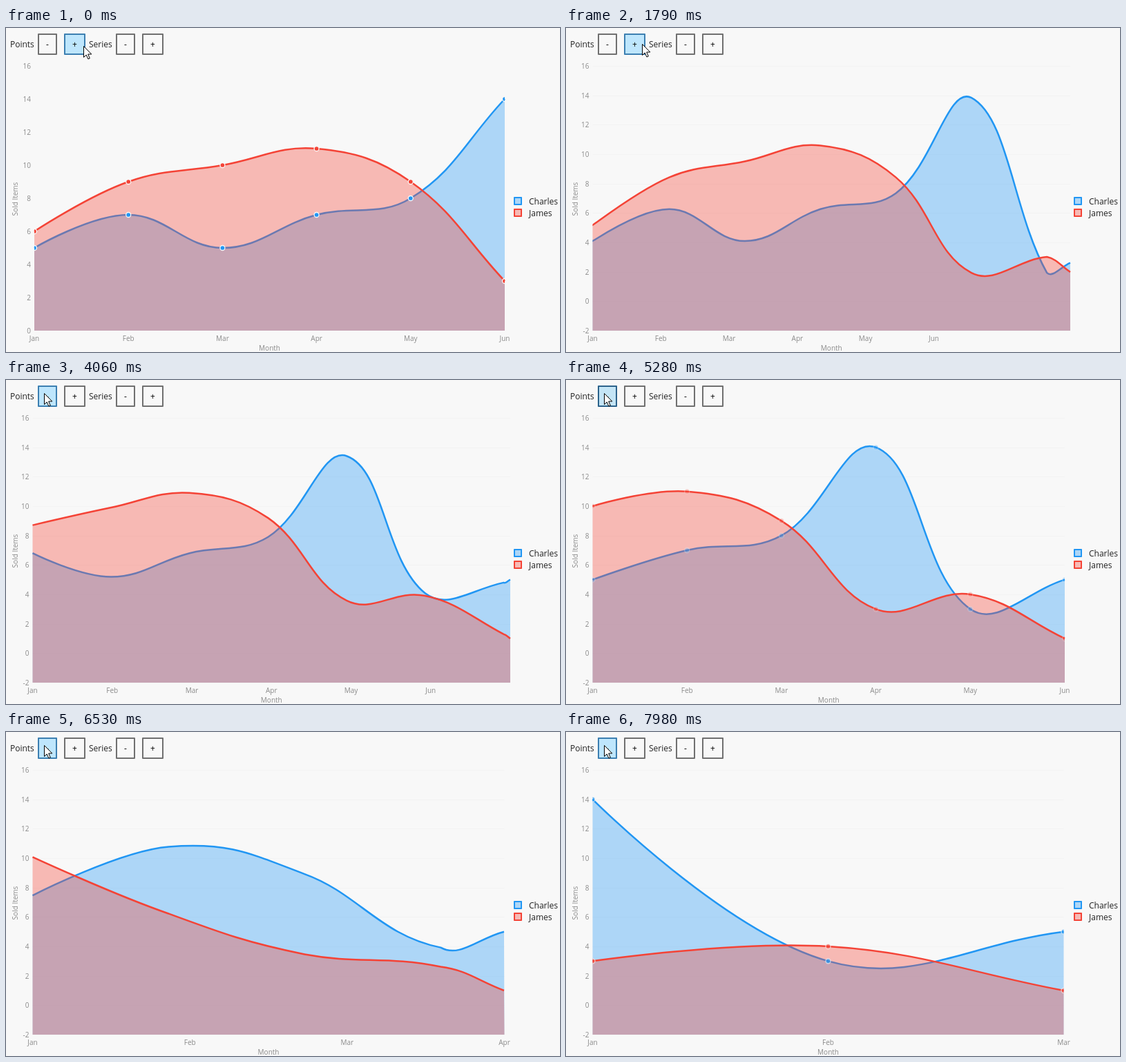
An HTML page with a canvas that plays this animation: 802x470 px, repeating every 8 s.

```html
<!DOCTYPE html>
<html lang="en">
<head>
<meta charset="utf-8">
<title>Points and series</title>
<style>
html, body { margin: 0; height: 100%; overflow: hidden; background: #f8f8f8; }
canvas { display: block; }
</style>
</head>
<body>
<canvas id="stage" width="802" height="470"></canvas>
<script>
const ctx = document.getElementById('stage').getContext('2d');
const LOOP = 8000, SPEED = 500, TOP = 55, BOTTOM = 439, BACK = '#f8f8f8', SMOOTHNESS = 0.8;
const months = ['Jan', 'Feb', 'Mar', 'Apr', 'May', 'Jun'];
const series = [
  { name: 'Charles', rgb: '33,150,243', values: [5, 7, 5, 7, 8, 14, 3, 5] },
  { name: 'James', rgb: '244,67,54', values: [6, 9, 10, 11, 9, 3, 4, 1] }
];

// Each view takes over at "start" and morphs from the one before it.
const views = [
  [-1000, 0, 6, 0, 41, 722],
  [540, 0, 7, 0, 41, 730],
  [1620, 0, 8, -2, 38.5, 730],
  [3610, 1, 7, -2, 38.5, 730],
  [4640, 2, 6, -2, 38.5, 722],
  [5460, 3, 5, -2, 38.5, 720.5],
  [6300, 4, 4, -2, 38.5, 721.5],
  [7140, 5, 3, -2, 38.5, 720.5]
].map(([start, first, count, min, left, right]) => ({ start, first, count, min, left, right }));

const presses = [[260, 500], [1400, 1590], [3320, 3570], [4420, 4600],
  [5230, 5420], [6080, 6260], [6910, 7100], [7740, 7970]];
const buttons = [[46, 28, '-'], [84, 31, '+'], [159, 28, '-'], [197, 31, '+']];

const clamp = v => Math.max(0, Math.min(1, v));
const lerp = (a, b, k) => a + (b - a) * k;
const mix = (a, b, k) => a.map((v, i) => lerp(v, b[i], k));
const xAt = (view, i) => lerp(view.left, view.right, i / (view.count - 1));
const yAt = (view, v) => lerp(BOTTOM, TOP, (v - view.min) / (16 - view.min));

// Smooth curve: a start point and one [c1, c2, end] group per segment.
function curve(view, values) {
  const pts = values.slice(view.first, view.first + view.count)
    .map((v, i) => [xAt(view, i), yAt(view, v)]);
  const dist = (a, b) => Math.hypot(a[0] - b[0], a[1] - b[1]);
  const control = (before, at, after, sign) => {
    const a = dist(before, at), b = dist(at, after);
    const share = (sign > 0 ? b : a) / (a + b);
    return at.map((v, k) => v + sign * SMOOTHNESS * share * (after[k] - before[k]) / 2);
  };
  const segments = pts.slice(1).map((end, i) => [
    ...(i ? control(pts[i - 1], pts[i], end, 1) : pts[0]),
    ...control(pts[i], end, pts[i + 2] || end, -1),
    ...end
  ]);
  return { pts, segments };
}

// Added segments grow out of the last point, removed ones shrink into it.
function morph(from, to, k) {
  const collapsed = ({ pts }) => Array(3).fill(pts[pts.length - 1]).flat();
  const longer = from.segments.length > to.segments.length ? from : to;
  return {
    start: [to.pts[0][0], lerp(from.pts[0][1], to.pts[0][1], k)],
    segments: longer.segments.map((_, i) =>
      mix(from.segments[i] || collapsed(from), to.segments[i] || collapsed(to), k))
  };
}

function text(str, x, y, size, color, align = 'left') {
  ctx.font = `${size}px "Open Sans", "Noto Sans", sans-serif`;
  ctx.fillStyle = color;
  ctx.textAlign = align;
  ctx.fillText(str, x, y);
}

function box(x, y, w, h, fill, stroke) {
  ctx.fillStyle = fill;
  ctx.strokeStyle = stroke;
  ctx.lineWidth = 2;
  ctx.fillRect(x, y, w, h);
  ctx.strokeRect(x + 1, y + 1, w - 2, h - 2);
}

function drawAxes(view) {
  const gray = '#8a8a8a', middle = (view.left + view.right) / 2;
  for (let v = view.min; v <= 16; v += 2) {
    const y = yAt(view, v);
    if (view.min < 0) {
      ctx.fillStyle = '#f3f3f3';
      ctx.fillRect(view.left, Math.round(y), view.right - view.left, 1);
    }
    text(v, view.left - 5, y + 4, 10, gray, 'right');
  }
  months.slice(0, view.count).forEach((m, i) => text(m, xAt(view, i), 454, 10, gray, 'center'));
  text('Month', middle, 468, 10, gray, 'center');
  ctx.save();
  ctx.translate(17, 248);
  ctx.rotate(-Math.PI / 2);
  text('Sold Items', 0, 0, 10, gray, 'center');
  ctx.restore();
}

function drawSeries({ rgb, values }, before, view, k) {
  const { start, segments } = morph(curve(before, values), curve(view, values), k);
  const line = new Path2D();
  line.moveTo(...start);
  segments.forEach(s => line.bezierCurveTo(...s));
  const area = new Path2D(line);
  area.lineTo(view.right, BOTTOM);
  area.lineTo(view.left, BOTTOM);
  ctx.fillStyle = `rgba(${rgb},.35)`;
  ctx.fill(area);
  ctx.strokeStyle = `rgb(${rgb})`;
  ctx.lineWidth = 2.5;
  ctx.lineJoin = 'round';
  ctx.stroke(line);
}

function drawMarkers({ rgb, values }, view, opacity) {
  ctx.save();
  ctx.beginPath();
  ctx.rect(view.left, TOP, view.right - view.left, BOTTOM - TOP);
  ctx.clip();
  ctx.globalAlpha = opacity;
  ctx.fillStyle = `rgb(${rgb})`;
  ctx.strokeStyle = BACK;
  ctx.lineWidth = 1.3;
  for (const [x, y] of curve(view, values).pts) {
    ctx.beginPath();
    ctx.arc(x, y, 3.5, 0, Math.PI * 2);
    ctx.fill();
    ctx.stroke();
  }
  ctx.restore();
}

function pointer(t) {
  if (t < 2420) return mix([113, 26], [111, 23], clamp((t - 15) / 60));
  const k = clamp((t - 2420) / 380);
  return mix([111, 23], [56, 19], k * k * (3 - 2 * k));
}

function drawControls(t, [px, py]) {
  text('Points', 6, 28, 12, '#222');
  text('Series', 120, 28, 12, '#222');
  const down = presses.some(([a, b]) => t >= a && t < b);
  for (const [x, w, label] of buttons) {
    const over = px >= x && px < x + w && py < 39;
    const [fill, edge] = !over ? [BACK, '#707070'] : down ? ['#c4e5f6', '#2c628b'] : ['#bee6fd', '#3c7fb1'];
    box(x, 8, w, 31, fill, edge);
    text(label, x + w / 2, 28, 12, '#000', 'center');
  }
  series.forEach(({ name, rgb }, i) => {
    const y = 245 + i * 17;
    box(735, y, 12, 12, `rgba(${rgb},.35)`, `rgb(${rgb})`);
    text(name, 757, y + 11, 12, '#222');
  });
}

function drawPointer([x, y]) {
  ctx.save();
  ctx.translate(x - 0.5, y + 0.5);
  const arrow = new Path2D('M0 0V16L3.7 12.5L6.4 18.5L8.8 17.5L6.2 11.5H11.3Z');
  ctx.fillStyle = '#fff';
  ctx.strokeStyle = '#000';
  ctx.lineWidth = 1;
  ctx.fill(arrow);
  ctx.stroke(arrow);
  ctx.restore();
}

function draw(t) {
  const index = views.filter(v => v.start <= t).length - 1;
  const view = views[index], before = views[index - 1] || view;
  const age = (t - view.start) / SPEED;
  const at = pointer(t);
  ctx.fillStyle = BACK;
  ctx.fillRect(0, 0, 802, 470);
  drawAxes(view);
  series.forEach(s => drawSeries(s, before, view, clamp(age)));
  if (age > 1) series.forEach(s => drawMarkers(s, view, clamp(age - 1)));
  drawControls(t, at);
  drawPointer(at);
}

function tick() {
  draw(performance.now() % LOOP);
  requestAnimationFrame(tick);
}
tick();
</script>
</body>
</html>
```
